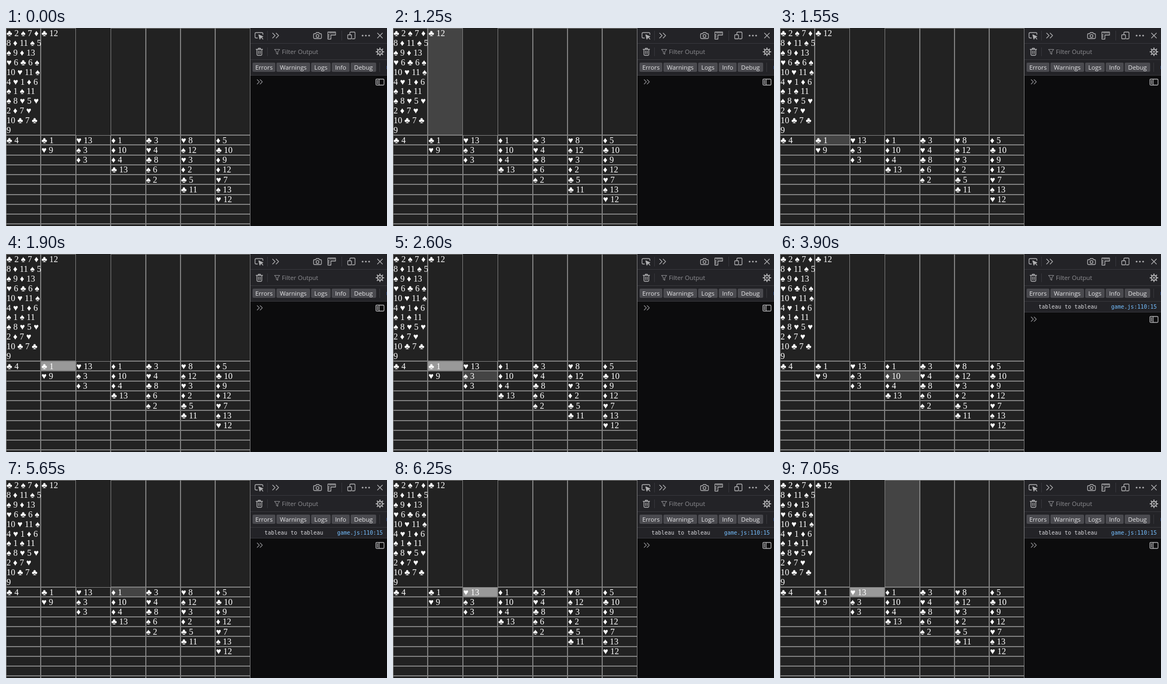
An HTML page for the animation above (8 s loop, 703 by 366 pixels).

```html
<!DOCTYPE html>
<html lang="en">
<head>
<meta charset="utf-8">
<title>Solitaire table with console</title>
<style>
html, body { margin: 0; width: 100%; height: 100%; overflow: hidden; background: #0c0c0d; }
svg { display: block; }
.card { font: 16px "Liberation Serif", "Times New Roman", serif; fill: #fff; white-space: pre; }
.ui { font: 11.3px "Open Sans", "Noto Sans", sans-serif; }
.mono { font: 10px "DejaVu Sans Mono", monospace; }
.icon { fill: none; stroke: #b1b1b3; stroke-width: 1.3; stroke-linecap: round; stroke-linejoin: round; }
</style>
</head>
<body>
<svg id="stage" width="703" height="366" viewBox="0 0 703 366"></svg>
<script>
const LOOP = 8000;
const BASE = '#222', HOVER = '#444', PICKED = '#999';

const stock = ['♣ 2 ♠ 7 ♦', '8 ♦ 11 ♠ 5', '♠ 9 ♦ 13', '♥ 6 ♣ 6 ♠', '10 ♥ 11 ♠', '4 ♥ 1 ♦ 6',
  '♠ 1 ♠ 11', '♠ 8 ♥ 5 ♥', '2 ♦ 7 ♥', '10 ♣ 7 ♣', '9'];
const columns = ['♣ 4', '♣ 1,♥ 9', '♥ 13,♠ 3,♦ 3', '♦ 1,♦ 10,♦ 4,♣ 13', '♣ 3,♥ 4,♣ 8,♠ 6,♠ 2',
  '♥ 8,♠ 12,♥ 3,♦ 2,♣ 5,♣ 11', '♦ 5,♣ 10,♦ 9,♦ 12,♥ 7,♠ 13,♥ 12'].map(s => s.split(','));

// Row -1 is the tall top row. Each step: time, hovered cell, picked cell, message logged.
const steps = [
  [0, '', '', false],
  [1250, '1,-1', '', false],
  [1550, '1,0', '', false],
  [1900, '', '1,0', false],
  [2550, '2,0', '1,0', false],
  [2600, '2,1', '1,0', false],
  [3150, '3,1', '1,0', false],
  [3800, '3,1', '', false],
  [3900, '3,1', '', true],
  [5650, '3,0', '', true],
  [5850, '2,0', '', true],
  [6250, '', '2,0', true],
  [7050, '3,-1', '2,0', true]
];

const rect = (x, y, w, h, fill, more = '') =>
  `<rect x="${x}" y="${y}" width="${w}" height="${h}" fill="${fill}" ${more}/>`;
const text = (x, y, s, cls, fill = '', more = '') =>
  `<text x="${x}" y="${y}" class="${cls}" ${fill && `fill="${fill}"`} ${more}>${s}</text>`;
const icon = (d, more = '') => `<path class="icon" d="${d}" ${more}/>`;

const colX = c => Math.round(64.4 * c);
const rowY = r => r < 0 ? 0 : Math.round(198 + 18.25 * r);
const card = (c, y, s) => text(64.4 * c + 1, y, s, 'card');

function cell(c, r) {
  const x = colX(c), y = rowY(r), w = colX(c + 1) - x, h = rowY(r + 1) - y;
  return rect(x, y, w, h, '#808080') +
    rect(x + 1, y + 1, w - 2, h - 2, BASE, `data-cell="${c},${r}"`);
}

function table() {
  let out = rect(0, 0, 451, 366, BASE);
  for (let c = 0; c < 7; c++) {
    for (let r = -1; r < 10; r++) if (c !== 2 || r >= 0) out += cell(c, r);
  }
  stock.forEach((s, i) => out += card(0, Math.round(15 + 17.9 * i), s));
  out += card(1, 15, '♣ 12');
  columns.forEach((list, c) => list.forEach((s, r) =>
    out += card(c, Math.floor(198 + 18.25 * r) + 15, s)));
  return out;
}

function toolbar() {
  const line = '#38383d';
  let out = rect(451, 0, 252, 366, '#0c0c0d') + rect(451, 0, 252, 87, '#232327') +
    rect(451, 28, 252, 1, line) + rect(451, 58, 252, 1, line) + rect(451, 87, 252, 1, line) +
    rect(482, 5, 1, 18, line) + rect(619, 5, 1, 18, line) +
    rect(482, 36, 1, 16, line) + rect(689, 64, 1, 17, line);
  // element picker, overflow chevrons
  out += icon('M464 18.5H461.5Q459.500 18.500 459.500 16.500V10.500Q459.500 8.500 461.500 8.500H472Q474 8.500 474 10.500V12') +
    icon('M466.500 12.500L468.500 20.500L470.300 17.300L474 16Z', 'style="fill:#b1b1b3"') +
    icon('M471 17L474 20.500') +
    icon('M492 9.500L496.500 14L492 18.500M498.500 9.500L503 14L498.500 18.500');
  // camera, ruler, responsive mode
  out += icon('M569 10.500H571.500L572.500 8.500H577.500L578.500 10.500H580.500Q582 10.500 582 12V18Q582 19.500 580.500 19.500H569Q567.500 19.500 567.500 18V12Q567.500 10.500 569 10.500Z') +
    icon('M572.200 14.800a2.600 2.600 0 1 0 5.200 0a2.600 2.600 0 1 0 -5.200 0') +
    icon('M594 7.500H608V13H599.500V20.500H594ZM598 8V10M601.500 8V10M605 8V10M594.500 13H596.500M594.500 16.500H596.500') +
    icon('M634.500 12V9Q634.500 7.500 636 7.500H642.500Q644 7.500 644 9V18.500Q644 20 642.500 20H639M631.500 12.500H636.500Q637.500 12.500 637.500 13.500V19Q637.500 20 636.500 20H631.500Q630.500 20 630.500 19V13.500Q630.500 12.500 631.500 12.500Z');
  for (const x of [658, 664, 670]) out += `<circle cx="${x}" cy="14" r="1.6" fill="#b1b1b3"/>`;
  out += icon('M685.500 9.500L694.500 18.500M694.500 9.500L685.500 18.500');
  // trash, filter, settings
  out += icon('M461.500 39.500H473.500M465.500 39V37.500H469.500V39M463 40V49Q463 50.500 464.500 50.500H470.500Q472 50.500 472 49V40M466 42.500V47.500M469 42.500V47.500') +
    icon('M495.500 39.500H505L501.500 44V48.500L499 47V44Z', 'style="stroke:#8a8a8e;stroke-width:1.1"') +
    text(509, 48, 'Filter Output', 'ui', '#8f8f93');
  out += '<g transform="translate(690 44)">' + icon('M-4.500 0a4.500 4.500 0 1 0 9 0a4.500 4.500 0 1 0 -9 0', 'style="stroke-width:2"') +
    '<circle r="1.8" fill="#b1b1b3"/>';
  for (let a = 0; a < 360; a += 45) out += icon('M0 -5.500V-7', `transform="rotate(${a})" style="stroke-width:2"`);
  out += '</g>';
  // level filters
  for (const [x, w, s] of [[455, 42, 'Errors'], [499, 62, 'Warnings'], [563, 36, 'Logs'], [601, 33, 'Info'], [636, 47, 'Debug']]) {
    out += rect(x, 64, w, 17, '#4a4a4f', 'rx="2"') + text(x + w / 2, 77, s, 'ui', '#e4e4e6', 'text-anchor="middle"');
  }
  return out + rect(702, 70, 1, 6, '#2a4a80');
}

function consoleBody() {
  return '<g id="log">' + rect(451, 88, 252, 20, '#232327') + rect(451, 107, 252, 1, '#38383d') +
    text(477, 101, 'tableau to tableau', 'mono', '#d7d7db') +
    text(611, 101, 'game.js:110:15', 'mono', '#75bfff') + '</g>' +
    '<g id="prompt">' +
    icon('M463.500 95.500L467.500 99.500L463.500 103.500M469 95.500L473 99.500L469 103.500', 'style="stroke:#8a8a8e"') +
    icon('M684 94.500H696Q697.500 94.500 697.500 96V104Q697.500 105.500 696 105.500H684Q682.500 105.500 682.500 104V96Q682.500 94.500 684 94.500ZM688.500 95V105M684.500 97.500H686.500M684.500 100H686.500M684.500 102.500H686.500') +
    '</g>';
}

const stage = document.getElementById('stage');
stage.innerHTML = table() + toolbar() + consoleBody();
const cells = [...stage.querySelectorAll('[data-cell]')];
const log = document.getElementById('log');
const prompt = document.getElementById('prompt');
let shown;

function show(step) {
  if (step === shown) return;
  shown = step;
  const [, hover, picked, logged] = step;
  for (const el of cells) {
    const id = el.dataset.cell;
    el.setAttribute('fill', id === picked ? PICKED : id === hover ? HOVER : BASE);
  }
  log.setAttribute('visibility', logged ? 'visible' : 'hidden');
  prompt.setAttribute('transform', `translate(0 ${logged ? 21 : 0})`);
}

function tick() {
  const t = performance.now() % LOOP;
  show(steps.findLast(s => s[0] <= t));
  requestAnimationFrame(tick);
}
tick();
</script>
</body>
</html>
```
